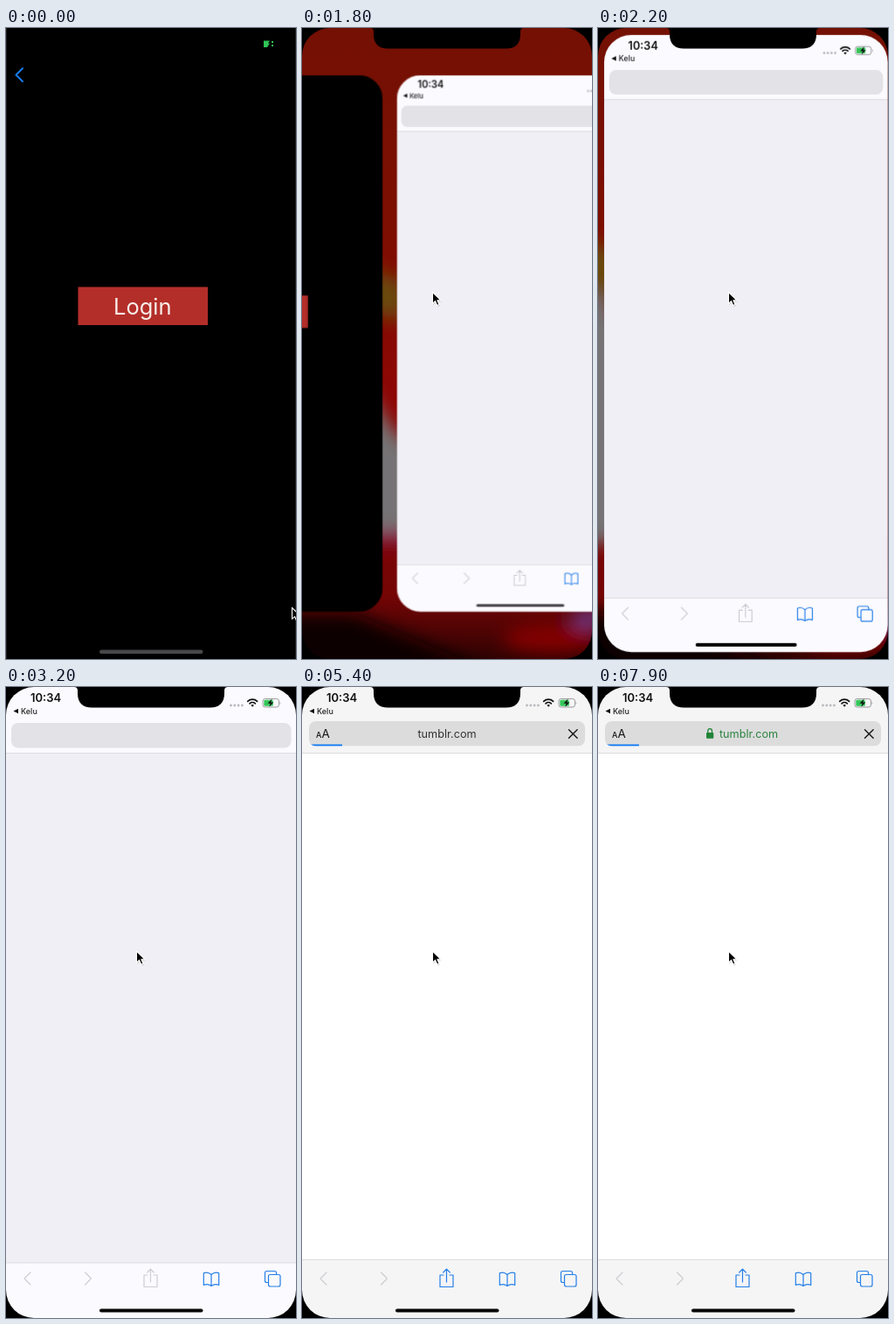
Animation, 332 px wide and 720 px high, one loop 8 s. Source, as an HTML page:

```html
<!DOCTYPE html>
<html lang="en">
<head>
<meta charset="utf-8">
<title>Login redirect</title>
<style>
  html, body { margin: 0; width: 100%; height: 100%; overflow: hidden; background: #000; }
  svg { display: block; width: 332px; height: 720px; font-family: Inter, Roboto, sans-serif; }

  .deck, .cursor, .home, .resting, .blank, .loaded, .plain, .secure, .progress, .wallpaper {
    animation: 8s linear infinite;
  }
  .deck { animation-name: deck; transform-origin: 166px 360px; }
  .cursor { animation-name: cursor; }
  .home { animation-name: home; }
  .progress { animation-name: progress; transform-origin: 10px 66px; }
  .resting, .blank, .loaded, .plain, .secure, .wallpaper { animation-timing-function: step-end; }
  .resting { animation-name: resting; }
  .wallpaper { animation-name: wallpaper; }
  .blank { animation-name: blank; }
  .loaded { animation-name: loaded; }
  .plain { animation-name: plain; }
  .secure { animation-name: secure; }

  @keyframes deck {
    0% { transform: translateX(0) scale(1); }
    16.25% { transform: translateX(0) scale(1); animation-timing-function: ease-in; }
    20% { transform: translateX(-80px) scale(.86); }
    22.5% { transform: translateX(-214.3px) scale(.85); }
    25% { transform: translateX(-308px) scale(.92); }
    27.5% { transform: translateX(-339.9px) scale(.978); animation-timing-function: ease-out; }
    31.25%, 100% { transform: translateX(-351px) scale(1); }
  }
  @keyframes cursor {
    0%, 1% { transform: translate(327px, 661px); animation-timing-function: ease-in-out; }
    12%, 100% { transform: translate(149px, 301px); }
  }
  @keyframes home { 0%, 22.5% { fill: #4a4649; } 26.5%, 100% { fill: #060606; } }
  @keyframes resting { 0% { opacity: 1; } 16.25%, 100% { opacity: 0; } }
  @keyframes wallpaper { 0% { opacity: 0; } 16.25% { opacity: 1; } 31.25%, 100% { opacity: 0; } }
  @keyframes blank { 0% { opacity: 1; } 56.25%, 100% { opacity: 0; } }
  @keyframes loaded { 0% { opacity: 0; } 56.25%, 100% { opacity: 1; } }
  @keyframes plain { 0% { opacity: 1; } 75%, 100% { opacity: 0; } }
  @keyframes secure { 0% { opacity: 0; } 75%, 100% { opacity: 1; } }
  @keyframes progress {
    0%, 56.25% { transform: scaleX(0); animation-timing-function: ease-out; }
    66% { transform: scaleX(.973); }
    100% { transform: scaleX(1); }
  }

  .line { fill: none; stroke-linecap: round; stroke-linejoin: round; }
  .blue { stroke: #257fe8; }
  .grey { stroke: #cdcdd1; }
</style>
</head>
<body>
<svg viewBox="0 0 332 720">
  <defs>
    <clipPath id="screen"><rect width="332" height="720" rx="32"/></clipPath>
    <clipPath id="field"><rect x="8" y="39" width="316" height="28.500" rx="8"/></clipPath>
    <filter id="soft" x="-50%" y="-50%" width="200%" height="200%"><feGaussianBlur stdDeviation="10"/></filter>
    <linearGradient id="red" x2="0" y2="1">
      <stop offset="0" stop-color="#741004"/>
      <stop offset=".3" stop-color="#7c0f02"/>
      <stop offset=".6" stop-color="#8e0605"/>
      <stop offset=".9" stop-color="#740505"/>
      <stop offset="1" stop-color="#300202"/>
    </linearGradient>
    <path id="share" d="M162 671h-4v13.500h15V671h-4M165.500 679v-14.500M161.700 668l3.800-3.800 3.800 3.800"/>
  </defs>

  <rect width="332" height="720"/>

  <g class="wallpaper" clip-path="url(#screen)">
    <rect width="332" height="720" fill="url(#red)"/>
    <g filter="url(#soft)">
      <path d="M-30 240L10 250 120 290V335L10 310-30 300Z" fill="#6b4a08"/>
      <path d="M-30 300L5 305 105 460 130 480V572L-30 592Z" fill="#757374"/>
      <path d="M80 574H130V588H80Z" fill="#8a1450"/>
      <path d="M-20 668H60Q110 690 230 740H-20Z" fill="#080101"/>
      <ellipse cx="285" cy="696" rx="55" ry="16" fill="#840505"/>
      <ellipse cx="328" cy="674" rx="20" ry="10" fill="#6d3a8c"/>
    </g>
  </g>

  <g class="deck">
    <!-- login screen -->
    <g clip-path="url(#screen)">
      <rect width="332" height="720"/>
      <g class="resting">
        <path class="line" d="M19 46L11.500 53.500 19 61" stroke="#147bf3" stroke-width="2"/>
        <path d="M295 14.500h7l-2 3h2l-3 4.500h-4ZM304 15h2v2h-2ZM304 19h2v2h-2Z" fill="#2fc455"/>
        <rect x="107" y="709.500" width="118.500" height="4.500" rx="2.250" fill="#47474a"/>
      </g>
      <rect x="82.500" y="295.500" width="148.500" height="43.500" fill="#b42e29"/>
      <text x="156.300" y="327" font-size="25.500" text-anchor="middle" fill="#f8eeea">Login</text>
    </g>

    <!-- browser screen -->
    <g transform="translate(351)">
      <g clip-path="url(#screen)">
        <g class="blank">
          <rect width="332" height="720" fill="#f0eff5"/>
          <path d="M0 0H332V75H0ZM0 657H332V720H0Z" fill="#fbfafe"/>
          <path d="M0 75.500H332M0 657H332" stroke="#dddde1"/>
          <rect x="6" y="41" width="320.500" height="28.500" rx="8" fill="#e3e2e6"/>
          <use href="#share" class="line grey" stroke-width="1.200"/>
        </g>
        <g class="loaded">
          <rect width="332" height="720" fill="#fff"/>
          <path d="M0 0H332V76H0ZM0 653H332V720H0Z" fill="#f5f5f6"/>
          <path d="M0 75.500H332M0 653.500H332" stroke="#dcdcdd"/>
          <g clip-path="url(#field)">
            <rect x="8" y="39" width="316" height="28.500" fill="#dcdcdd"/>
            <rect class="progress" x="10" y="65.500" width="37" height="2" fill="#0b78f5"/>
          </g>
          <text x="16" y="58" font-size="9" font-weight="500" fill="#161616">A<tspan font-size="13.500" font-weight="400">A</tspan></text>
          <path class="line" d="M305.500 48.700l9.600 9.600m0-9.600l-9.600 9.600" stroke="#161616" stroke-width="1.400"/>
          <text class="plain" x="166" y="58" font-size="12.700" text-anchor="middle" fill="#333">tumblr.com</text>
          <g class="secure">
            <rect x="124" y="52" width="8.300" height="6.800" rx="1" fill="#218437"/>
            <path class="line" d="M125.800 52v-2a2.350 2.350 0 0 1 4.700 0v2" stroke="#218437" stroke-width="1.300"/>
            <text x="172.500" y="58" font-size="12.700" text-anchor="middle" fill="#2c8440">tumblr.com</text>
          </g>
          <use href="#share" class="line blue" stroke-width="1.200"/>
        </g>

        <!-- status bar -->
        <text x="28" y="17" font-size="13" font-weight="600" fill="#111">10:34</text>
        <path d="M8.500 27.500l5.500-2.800v5.600Z" fill="#111"/>
        <text x="17" y="30.700" font-size="9" font-weight="500" fill="#222">Kelu</text>
        <path class="line" d="M257.500 21h12.950" stroke="#b9b9bd" stroke-width="2.800" stroke-dasharray="0 4.300"/>
        <path class="line" d="M276.700 16.300a7.800 7.800 0 0 1 10.900 0M279 18.800a4.600 4.600 0 0 1 6.300 0" stroke="#111" stroke-width="1.700"/>
        <path d="M280.400 20.800a2.700 2.700 0 0 1 3.500 0l-1.750 2Z" fill="#111"/>
        <rect x="294" y="13.500" width="18.500" height="9.500" rx="2.700" fill="none" stroke="#909094" stroke-width=".9"/>
        <rect x="295.300" y="14.800" width="10.500" height="6.900" rx="1.300" fill="#35c759"/>
        <path d="M304.500 13.500l-5 5.200h3l-1.200 4.100 5-5.300h-3Z" fill="#111"/>
        <path d="M313.700 16.500q1.500 1.700 0 3.500Z" fill="#909094"/>

        <!-- toolbar -->
        <g class="line" stroke-width="1.200">
          <path class="grey" d="M28 668l-7 7 7 7M90.500 668l7 7-7 7"/>
          <path class="blue" d="M235 670.500q-4-3.800-8.700-1.700v13.700q4.700-2 8.700 1 4-3 8.700-1v-13.700q-4.700-2.100-8.700 1.700v13"/>
          <g class="blue">
            <path d="M300.500 679.500h-2a2 2 0 0 1-2-2v-9a2 2 0 0 1 2-2h9a2 2 0 0 1 2 2v2"/>
            <rect x="300.500" y="670.500" width="13.500" height="13.500" rx="2"/>
          </g>
        </g>
        <rect class="home" x="107" y="709.500" width="118.500" height="4" rx="2"/>
      </g>
    </g>
  </g>

  <path class="resting" d="M.5 0V720M331.500 0V720" stroke="#202020"/>
  <path d="M78 0Q82 0 82 4V7Q82 23.500 98.500 23.500H233.500Q250 23.500 250 7V4Q250 0 254 0Z"/>

  <g class="cursor">
    <path d="M1.500 2V15L4.500 12.300 6.700 17 9 16 6.900 11.300H10.800Z" fill="#000" opacity=".15"/>
    <path d="M.5.500V13.300L3.500 10.600 5.700 15.500 8 14.500 5.900 9.700H9.800Z" stroke="#fff" stroke-width="1.100" stroke-linejoin="round"/>
  </g>
</svg>
</body>
</html>
```
